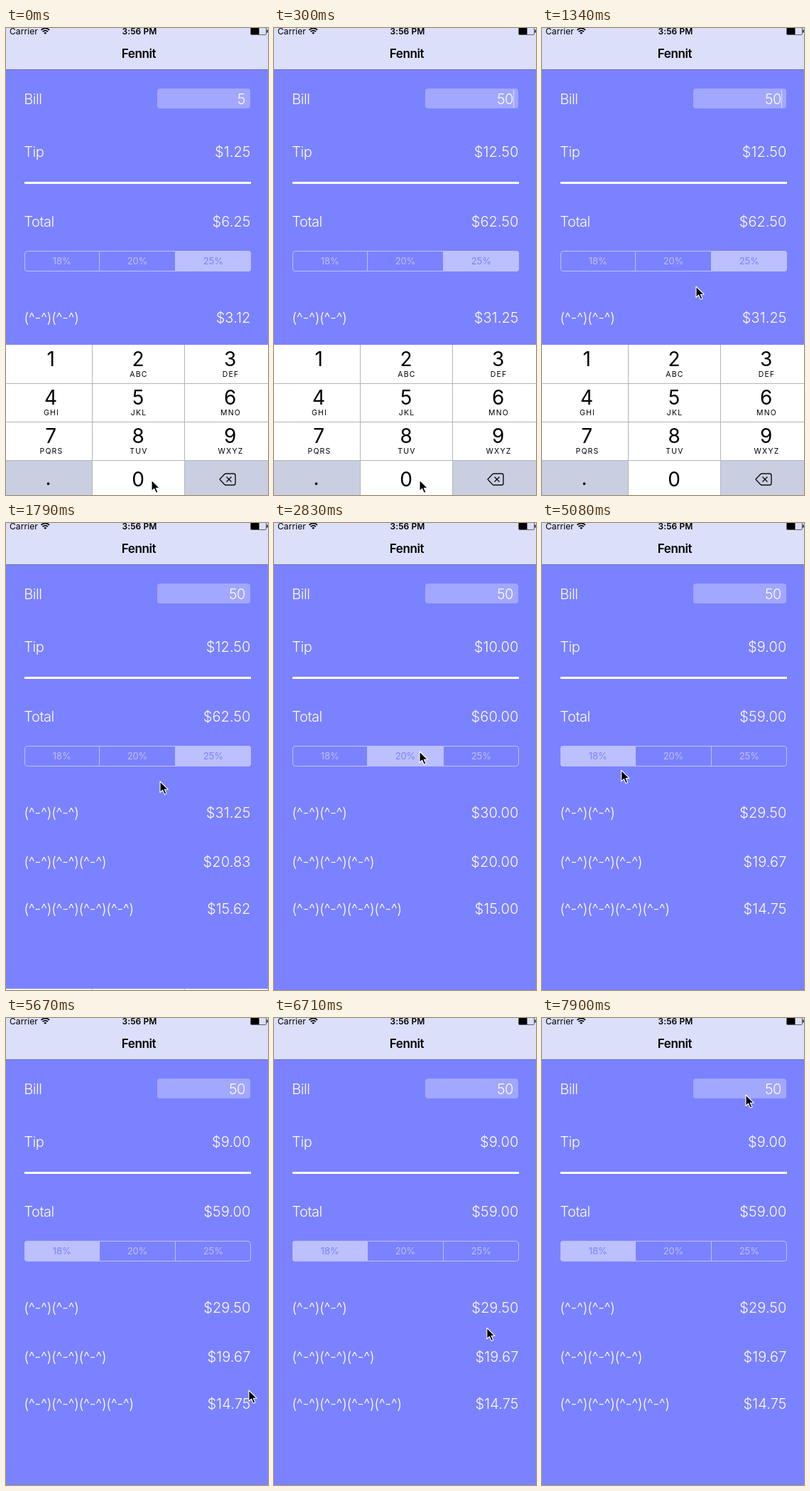
Write an HTML page that moves like this. It is 369 px wide and 656 px high and loops after 8000 ms.

```html
<!DOCTYPE html>
<html lang="en">
<head>
<meta charset="utf-8">
<title>Fennit</title>
<style>
  html, body { margin: 0; width: 100%; height: 100%; overflow: hidden; background: #7b82ff; }
  svg { display: block; width: 100vw; height: 100vh; font-family: Inter, "Open Sans", sans-serif; }
  .body { font-size: 20px; font-weight: 300; letter-spacing: -.45px; fill: #fff; }
  .amount { letter-spacing: .1px; }
  .end { text-anchor: end; }
  .mid { text-anchor: middle; }
  .status { font-size: 12px; letter-spacing: .1px; }
  .title { font-size: 17px; font-weight: 600; letter-spacing: -.4px; }
  .segment { font-size: 13px; letter-spacing: -.1px; }
  .digit { font-size: 28px; letter-spacing: -.3px; }
  .letters { font-size: 10.5px; letter-spacing: 1.2px; }
</style>
</head>
<body>
<svg viewBox="0 0 369 656" preserveAspectRatio="none">
  <rect width="369" height="656" fill="#7b82ff"/>
  <rect width="369" height="58" fill="#dbdff9"/>
  <path d="M0 58.5H369" stroke="#666dca"/>

  <g class="status">
    <text x="5" y="9">Carrier</text>
    <text class="mid" x="188" y="9" font-weight="600">3:56 PM</text>
  </g>
  <g fill="none" stroke="#000" stroke-width="1.7">
    <path d="M49.5 2.8Q55.3-2 61.1 2.8M51.6 5.2Q55.3 2 59 5.2"/>
    <path d="M55.3 8.8L53.2 6.8Q55.3 5.2 57.4 6.8Z" fill="#000" stroke="none"/>
  </g>
  <rect x="344.5" y="-.5" width="22" height="10" rx="1.5" fill="none" stroke="#444" stroke-width=".8"/>
  <rect x="345" y="0" width="11.5" height="9" fill="#000"/>
  <path d="M368 2.5V6.5" stroke="#222" stroke-width="1.5"/>
  <text class="title mid" x="187" y="42">Fennit</text>

  <rect x="213" y="85" width="131" height="28" rx="4" fill="#a2a7ff"/>
  <g id="labels" class="body"></g>
  <path id="caret" d="M337.5 87V112" stroke="#d4d7ff" stroke-width="1.3"/>
  <rect x="26" y="216" width="319" height="3" fill="#fff"/>

  <clipPath id="round"><rect x="26" y="313" width="319" height="29" rx="4"/></clipPath>
  <rect id="selected" y="313" height="29" fill="#bcc0ff" clip-path="url(#round)"/>
  <rect x="26.5" y="313.5" width="318" height="28" rx="3.5" fill="none" stroke="#bcc0ff"/>
  <path d="M131.5 313V342M238.5 313V342" stroke="#bcc0ff"/>
  <g id="segments" class="segment mid"></g>

  <g id="keyboard">
    <rect y="445" width="369" height="211" fill="#fff"/>
    <path d="M0 608H121V656H0ZM252 608H369V656H252Z" fill="#c9cee1"/>
    <rect id="zero" x="122" y="608" width="129" height="48" fill="#c9cee1"/>
    <path d="M0 499.5H369M0 553.5H369M0 607.5H369M121.5 445V656M251.5 445V656" stroke="#b3b5bd"/>
    <g id="keys" class="mid"></g>
    <g fill="none" stroke="#111" stroke-width="1.4" stroke-linejoin="round">
      <path d="M301 634L307.5 627Q308.5 626 310 626H320.5Q323 626 323 628.5V639.5Q323 642 320.5 642H310Q308.5 642 307.5 641Z"/>
      <path d="M310.5 630.5L317.5 637.5M317.5 630.5L310.5 637.5"/>
    </g>
  </g>

  <path id="pointer" d="M0 0V15.5L3.6 12.2L6.4 18.2L9 17.1L6.3 11.2H11.2Z"
    fill="#000" stroke="#fff" stroke-width="1.1" stroke-linejoin="round"/>
</svg>
<script>
const LOOP = 8000;
const TICK = 149;
const LEAD = 6;

const $ = id => document.getElementById(id);
const clamp = p => Math.min(1, Math.max(0, p));
const smooth = p => p * p * (3 - 2 * p);

function addText(parent, text, x, y, cls = '') {
  const el = document.createElementNS('http://www.w3.org/2000/svg', 'text');
  el.setAttribute('x', x);
  el.setAttribute('y', y);
  el.setAttribute('class', cls);
  el.textContent = text;
  parent.append(el);
  return el;
}

const face = '(^-^)';
const rows = [['Bill', 107], ['Tip', 181], ['Total', 279],
  ...[413.5, 482.5, 548.5].map((y, i) => [face.repeat(i + 2), y])];
const [billText, ...amounts] = rows.map(([label, y], i) => {
  addText($('labels'), label, 25.3, y);
  return addText($('labels'), '', i ? 344.5 : 337, y, i ? 'end amount' : 'end');
});

const edges = [26, 131.5, 238.5, 345];
const segments = [.18, .20, .25].map((rate, i) => {
  const x = edges[i], width = edges[i + 1] - x;
  const text = addText($('segments'), Math.round(rate * 100) + '%', x + width / 2, 332);
  return { rate, x, width, text };
});

const columns = [63, 186, 315.5];
['', 'ABC', 'DEF', 'GHI', 'JKL', 'MNO', 'PQRS', 'TUV', 'WXYZ'].forEach((letters, i) => {
  const x = columns[i % 3], y = 475 + 54 * Math.floor(i / 3);
  addText($('keys'), i + 1, x, y, 'digit');
  addText($('keys'), letters, x + 1, y + 15, 'letters');
});
addText($('keys'), '.', 59.5, 642, 'digit');
addText($('keys'), '0', 186, 644, 'digit');

// Pointer moves, timed in ticks; sag bends the path downwards.
const home = { x: 205, y: 635 };
const moves = [
  { from: 4, to: 9, x: 217, y: 363 },
  { from: 14, to: 18, x: 205, y: 321 },
  { from: 20, to: 25, x: 85, y: 327 },
  { from: 33, to: 38, x: 342, y: 523 },
  { from: 38, to: 42, x: 303, y: 515, sag: 15 },
  { from: 43, to: 50, x: 287, y: 113 },
  { from: 51, to: 53, x: 287, y: 108 },
];

function pointerAt(tick) {
  let { x, y } = home;
  for (const move of moves) {
    const p = smooth(clamp((tick - move.from) / (move.to - move.from)));
    x += (move.x - x) * p;
    y += (move.y - y) * p + 4 * p * (1 - p) * (move.sag ?? 0);
  }
  return [x, y];
}

// Exact halves round down.
const money = value => '$' + (value - 1e-9).toFixed(2);

function draw(t) {
  const tick = Math.floor((t + LEAD) / TICK);
  const bill = tick < 1 ? 5 : 50;
  const editing = tick < 12;
  const caretOn = editing && tick > 0 && (tick - 1) % 7 < 4;
  const shift = 211 * (1 - (1 - clamp((tick - 11) / 2)) ** 7);
  const segment = segments[tick < 19 ? 2 : tick < 26 ? 1 : 0];
  const tip = bill * segment.rate, total = bill + tip;

  billText.textContent = bill;
  billText.setAttribute('y', editing ? 107 : 106.5);
  [tip, total, total / 2, total / 3, total / 4].forEach((value, i) => {
    amounts[i].textContent = money(value);
  });

  $('selected').setAttribute('x', segment.x);
  $('selected').setAttribute('width', segment.width);
  for (const s of segments) s.text.setAttribute('fill', s === segment ? '#7b82ff' : '#bcc0ff');

  $('caret').setAttribute('opacity', +caretOn);
  $('zero').setAttribute('opacity', +(tick === 1));
  $('keyboard').setAttribute('transform', `translate(0 ${shift})`);
  $('pointer').setAttribute('transform', `translate(${pointerAt(tick)})`);
}

const start = performance.now();
function frame() {
  draw((performance.now() - start) % LOOP);
  requestAnimationFrame(frame);
}
draw(0);
requestAnimationFrame(frame);
</script>
</body>
</html>
```
